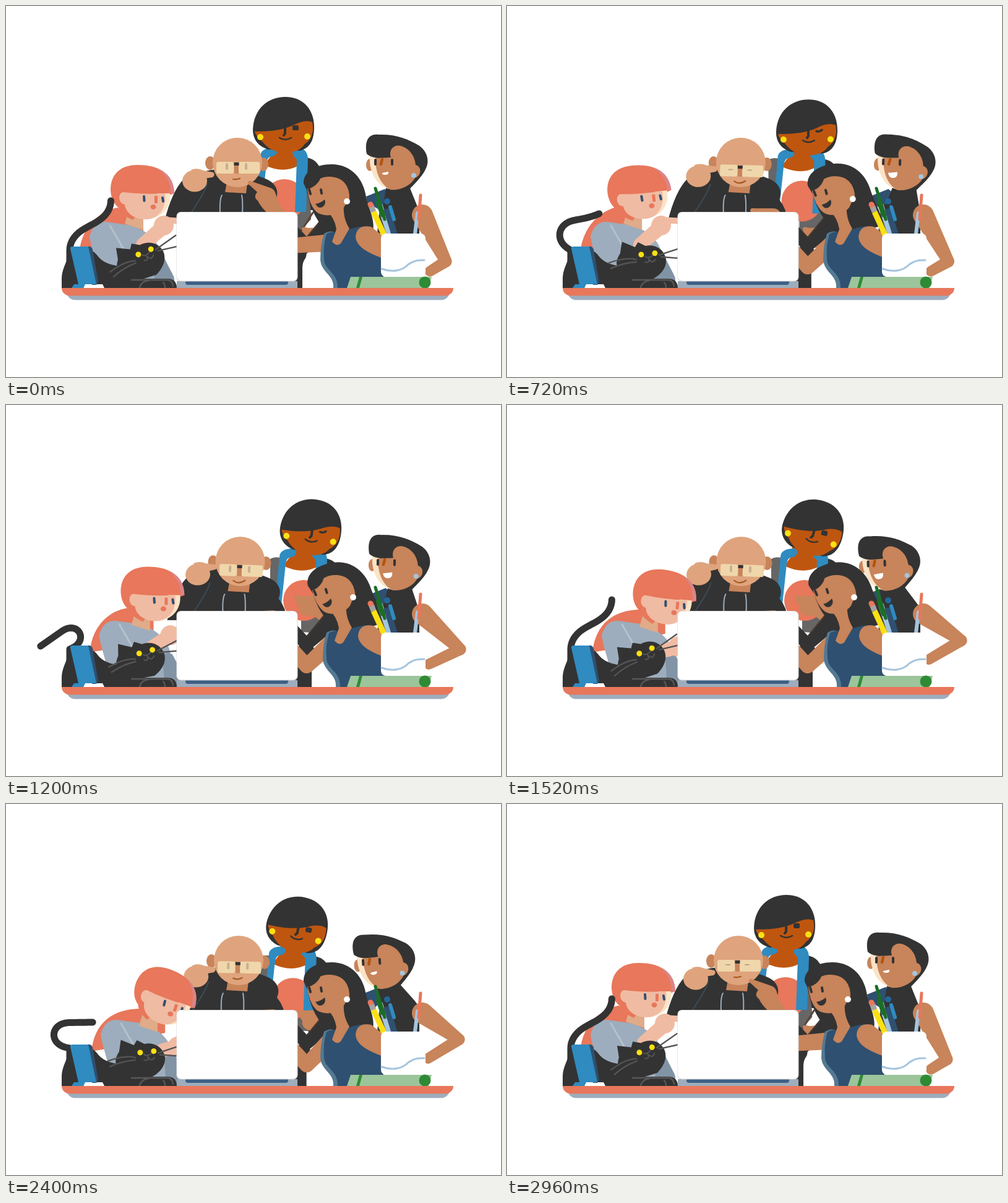
An HTML page with a canvas that plays this animation: 800 by 600 pixels, repeating every 3 s.

```html
<!DOCTYPE html>
<html lang="en">
<head>
<meta charset="utf-8">
<title>Around the laptop</title>
<style>
html, body { margin: 0; width: 100%; height: 100%; overflow: hidden; background: #fff; }
canvas { display: block; }
</style>
</head>
<body>
<canvas id="stage" width="800" height="600"></canvas>
<script>
const c = document.getElementById('stage').getContext('2d');
const DARK = '#333', CORAL = '#e8775b', TAN = '#c8845a', BLUE = '#2f8bc0', NAVY = '#2f5070',
  STEEL = '#9dadbd', CREAM = '#fbe3c6', PINK = '#f0bba3', SAND = '#dfa47d', BROWN = '#bf560f',
  SKY = '#a5c5de', YELLOW = '#fbe012', GRAY = '#666';
const LOOP = 3000, SWISH = LOOP / 2;
let now = 0;

const during = (a, b) => now >= a && now < b;
function ease(from, to, t) {
  const u = Math.max(0, Math.min(1, (t - from) / (to - from)));
  return u * u * (3 - 2 * u);
}
// Rises from 0 to 1 between a and b, falls back between d and e
const hold = (a, b, d, e, t = now) => ease(a, b, t) - ease(d, e, t);

function fill(color, d) { c.fillStyle = color; c.fill(new Path2D(d)); }
function line(color, width, d) {
  c.strokeStyle = color;
  c.lineWidth = width;
  c.stroke(new Path2D(d));
}
function oval(color, x, y, rx, ry = rx) {
  c.fillStyle = color;
  c.beginPath();
  c.ellipse(x, y, rx, ry, 0, 0, 7);
  c.fill();
}
function box(color, x, y, w, h, r = 0) {
  c.fillStyle = color;
  c.beginPath();
  c.roundRect(x, y, w, h, r);
  c.fill();
}
// Capsule whose ends have different radii
function limb(color, x1, y1, r1, x2, y2, r2) {
  const a = Math.atan2(y2 - y1, x2 - x1);
  const b = Math.acos((r1 - r2) / Math.hypot(x2 - x1, y2 - y1));
  c.fillStyle = color;
  c.beginPath();
  c.arc(x1, y1, r1, a + b, a - b + 2 * Math.PI);
  c.arc(x2, y2, r2, a - b, a + b);
  c.fill();
}
function move(dx, dy, deg, px, py, draw) {
  c.save();
  c.translate(px + dx, py + dy);
  c.rotate(deg * Math.PI / 180);
  c.translate(-px, -py);
  draw();
  c.restore();
}
const shift = (dx, dy, draw) => move(dx, dy, 0, 0, 0, draw);
const lookIn = () => hold(150, 900, 1700, 3000);

function standingWoman() {
  const lean = lookIn(), tilt = hold(600, 2000, 2050, 2900);
  shift(15 * lean, 0, () => fill(DARK, 'M440 390H480Q490 400 482 411Q479 416 479 425V456H440Z'));
  shift(31 * lean, 3 * lean, () => {
    fill(DARK, 'M484 245C500 246 511 260 513 282L508 330L484 330Z');
    fill(GRAY, 'M396 246Q402 242 412 244V330H396ZM466 295L486 300Q494 325 493 345L474 366L446 364V330Z');
    line('#5a4438', 3, 'M496 334L476 366');
    fill('#fff', 'M417 240H472V333H417Z');
    oval(CORAL, 450, 313, 33);
    oval(CORAL, 480, 282, 11);
    fill(BROWN, 'M430 222H468V240L473 258Q448 272 417 257L430 240Z');
    fill(BLUE, 'M411 243C411 234 419 229 433 229C441 230 439 242 431 243Q422 243 421 254L414 320H404ZM466 228C479 227 488 234 488 248L485 333H467L470 248Q462 242 463 234Z');
  });
  move(42 * lean, 5 * lean, 20 * tilt, 449, 211, () => {
    fill(DARK, 'M399 200C400 166 424 147 451 147C482 147 498 169 498 196C498 217 491 230 475 234L424 232C407 227 399 215 399 200Z');
    fill(BROWN, 'M402 203C430 203 450 200 466 192C478 186 488 185 495 188C499 207 491 218 483 223C475 235 463 237 450 237C432 237 421 228 414 219Q404 211 402 203Z');
    line(DARK, 4, 'M451 196V206L449 209');
    line(DARK, 2.4, 'M442 213Q451 219 461 213');
    if (during(610, 1370)) line(DARK, 3.5, 'M464 198Q468 200 473 196');
    else box(DARK, 463, 193, 10, 8, 2);
    oval(YELLOW, 411, 212, 5);
    oval(YELLOW, 487, 211, 5);
  });
}

function baldMan() {
  const lean = lookIn(), drop = hold(100, 900, 2450, 2950);
  shift(4.5 * lean, 0, () => {
    fill(DARK, 'M340 264Q318 266 304 274L287 280Q268 300 256 348H450Q448 328 436 313C442 300 437 285 416 278L400 272Z');
    line('#3b4c57', 2, 'M325 288Q322 300 300 333');
    fill(TAN, 'M357 284L390 286L388 303L354 301Z');
    line(STEEL, 2, 'M349 306Q345 312 346 336M381 306Q383 316 382 336');
    oval(TAN, 330, 254, 8, 11);
    oval(TAN, 416, 256, 8, 11);
    oval(SAND, 374, 253, 40);
  });
  move(5 * lean, 6 * lean, 2 * lean, 374, 260, () => {
    box(TAN, 369, 257, 7, 14, 2);
    box('#efd7ab', 340, 252, 28, 19, 3);
    box('#efd7ab', 376, 252, 34, 19, 3);
    box(DARK, 368.5, 253, 8, 5);
    if (during(660, 790) || now >= 2900) line('#b9a488', 1.8, 'M354 260H360M385 260H391');
    else { box('#c9ae93', 355, 254, 4, 11, 2); box('#c9ae93', 386, 254, 4, 11, 2); }
    const s = 4 * lean;
    line('#a55a20', 2.2, `M${367 - s} ${280 - s * .4}Q372 ${281 + s} ${378 + s} ${279 - s * .4}`);
  });
  move(5 * lean, -9 * lean, -4 * lean, 306, 282, () => {
    oval(SAND, 305, 283, 20, 17.5);
    fill(SAND, 'M299 265C306 262 313 263 319 266L335 269Q339 273 334 277L321 279L312 290Z');
  });
  move(8 * drop, 40 * drop, -22 * drop, 420, 305, () =>
    fill(TAN, 'M391 285Q393 281 398 284L427 294C438 298 435 307 441 319L453 336H424Q413 327 407 315Q399 309 406 301L394 290Q390 288 391 285Z'));
}

function rightPerson() {
  const hx = 11 * hold(100, 720, 900, 1600) - 24 * hold(1000, 1950, 2200, 2950);
  const hy = 3 * hold(300, 1500, 1900, 2900);
  shift(hx * .4, 0, () => fill(NAVY, 'M582 308L612 296L624 306L604 330L584 318Z'));
  fill(DARK, 'M600 368L604 325L640 305L668 326V368Z');
  limb(DARK, 638, 338, 30, 632 + hx, 288 + hy, 17);

  const lift = hold(750, 1600, 2350, 2900);
  const ex = 711 + 23 * hold(600, 1200, 2300, 2850), ey = 413 - 33 * lift;
  limb(TAN, 673, 338, 17, ex, ey, 9.5);
  limb(TAN, ex, ey, 9.5, 685 - 3 * lift, 429 - 18 * lift, 8.5);

  move(hx, hy, hx * .2, 631, 255, () => {
    oval(TAN, 588, 257, 6, 10);
    fill(CREAM, 'M588 242H610L625 297C602 295 586 271 588 242Z');
    fill(DARK, 'M583 239C579 218 586 206 602 208C630 207 650 215 668 226C682 236 684 252 679 262C672 279 654 292 646 304L624 298L650 270L622 245C607 248 590 246 583 239Z');
    fill(TAN, 'M597 246L622 245C618 232 627 224 637 226C653 230 661 244 662 257C672 259 672 275 661 278C654 291 636 299 621 297C604 288 597 268 597 246Z');
    line(DARK, 4, 'M597 249V256M624 249V256');
    line('#b4540f', 4.5, 'M608 248L606 256');
    const m = 5 * hold(100, 720, 1500, 2600);
    fill('#fff', `M${608 - m / 2} 270Q613 269 ${618 + m / 2} 268Q${619 + m / 2} ${273 + m} 613 ${273 + m}Q607 ${273 + m} ${608 - m / 2} 270Z`);
    oval(SKY, 659, 274, 4);
  });
}

function frontWoman() {
  const nod = hold(100, 1000, 2050, 2400), bend = hold(100, 650, 2500, 2950);
  const hide = 1 - hold(800, 1200, 2100, 2700);
  shift(12 * hide, 50 * hide, () =>
    fill(TAN, 'M466 309Q469 306 476 309L495 308C502 310 504 318 507 327L518 340L508 350Q498 338 487 341C477 341 471 333 473 326L467 317Z'));
  fill(DARK, 'M471 357L486 373L515 338L548 330V362L520 372L484 402L471 386Z');
  line('#4c3a30', 2, 'M487 373L515 339');
  const ex = 455 + 31 * bend, ey = 388 + 34 * bend;
  limb(TAN, 524 + 4 * nod, 383, 14, ex, ey, 12);
  limb(TAN, ex, ey, 12, 455, 388, 12);

  const withHead = draw => move(8 * nod, -2 * nod, -8 * nod, 530, 300, draw);
  withHead(() => fill(DARK, 'M481 287C480 268 500 256 526 256C560 256 577 282 581 304C585 326 597 345 593 364L548 372L524 370C504 352 491 328 488 302Z'));
  shift(4 * nod, 0, () => {
    fill('#547991', 'M514 368Q524 362 531 366L545 456H529C531 435 509 431 508 410Q508 388 514 368Z');
    fill(NAVY, 'M518 369Q524 364 533 366L553 362Q574 354 590 357L610 400V456H536C537 430 514 428 514 409Q512 389 518 369Z');
    fill(TAN, 'M518 331L546 320Q544 343 555 360L541 384Q534 390 527 381L534 361Q531 342 518 331Z');
    fill(TAN, 'M612 409C589 401 566 391 565 373Q567 353 590 357L612 374Z');
  });
  withHead(() => {
    fill(TAN, 'M487 296C497 294 505 287 508 279C520 273 540 276 548 287Q556 297 555 314Q548 321 544 329C535 338 519 341 507 336C495 331 489 313 487 296Z');
    if (during(1970, 2090)) { oval(DARK, 492, 301, 3); oval(DARK, 510, 300, 3); }
    else line(DARK, 4, 'M490 297L492 304M509 297L510 303');
    line(CORAL, 2, 'M492 316L498 317');
    fill(DARK, 'M500 320Q508 319 515 313C519 322 509 330 503 324Z');
    oval('#fff', 551, 316, 5);
  });
}

function deskRight() {
  line(CORAL, 9, 'M589 321L591 325');
  c.lineCap = 'butt';
  line('#a4a4a4', 9, 'M591 325L594 333');
  line(YELLOW, 9, 'M594 333L611 370');
  line(SKY, 9, 'M604 322L620 370');
  line(NAVY, 10, 'M615 328L628 370');
  c.lineCap = 'round';
  line('#1b6e24', 5, 'M597 295L612 345');
  line('#1b6e24', 8, 'M602 318L609 338');
  oval('#23679a', 616, 316, 5);
  line(BLUE, 6, 'M621 325L627 345');
  line(SKY, 6, 'M665 335L661 368');
  line(CORAL, 5, 'M670 306L667 345');
  box('#fff', 606, 368, 72, 70, 8);
  line(SKY, 3, 'M607 425C626 432 642 427 650 418C659 411 668 411 676 411');
  fill('#9cc59b', 'M557 438H688L683 456H551Z');
  fill('#2f8a35', 'M571 438H576L571 456H566Z');
  oval('#2f8a35', 677, 447, 9.5);
}

function redhead() {
  const back = hold(150, 650, 700, 1150), lean = hold(800, 1650, 2350, 2900);
  const slide = hold(720, 1350, 2400, 2900), peek = hold(1300, 1950, 2400, 2850);
  const hx = 36 * lean - 6 * back, hy = 10 * lean, bx = 18 * slide, tx = 118 + 20 * slide;
  fill(CORAL, `M${tx} 400C${tx + 5} 352 ${tx + 36} 332 ${180 + hx} ${326 + hy * .5}L${222 + hx} ${340 + hy}V${365 + hy * .5}L${150 + bx} 395Z`);
  shift(bx, 0, () => {
    fill(STEEL, 'M135 373C140 355 148 349 162 349L197 354C225 360 248 380 250 402L265 456H150C152 422 139 400 135 373Z');
    line('#b4c2cb', 3, 'M168 355L195 402');
    limb('#8194a5', 247, 410, 9, 256, 443, 16);
  });
  shift(hx * .65, hy * .7, () => fill('#e0ab88', 'M198 332H222V362L192 352Z'));

  const px = 257 + 23 * lean - 6 * back, py = 355 + 38 * lean;
  limb(PINK, 221 + 32 * lean - 6 * back, 386 + 13 * lean, 11, px, py, 12);
  oval(PINK, px - 2, py, 16);
  line(PINK, 10, `M${px - 4} ${py - 9}L285 ${py - 7}`);

  move(hx, hy, 19 * peek - 6 * back, 220, 305, () => {
    fill(CORAL, 'M169 298C169 270 187 257 213 257C250 257 272 274 272 303L225 320L205 346Q187 338 184 328Q170 318 169 298Z');
    fill('#da858a', 'M245 263Q271 273 272 303H266Q266 278 245 263Z');
    fill(CREAM, 'M245 303H265C267 322 256 342 229 345Z');
    fill(PINK, 'M190 301Q220 305 257 303C260 326 247 346 224 345C205 344 193 333 192 321C180 319 181 301 190 301Z');
    line(NAVY, 4, 'M223 308L223.5 315M253 310L254 316');
    box(CORAL, 240, 307, 5, 12, 1);
    oval(CORAL, 238, 325, 4.5, 4);
  });
}

// The tail grows segment by segment; its bend blends a rest, a curl and a whip
function tail(t) {
  const curl = hold(250, 950, 950, 1130, t), whip = hold(950, 1150, 1200, 1440, t);
  const steps = 28, length = 110;
  let x = 103, y = 395, d = `M103 419L${x} ${y}`;
  for (let i = 0; i < steps; i++) {
    const s = (i + .5) / steps;
    const rest = 62 * Math.sin(Math.PI * s);
    const curled = 170 * ease(0, .7, s) - 80, whipped = 65 - 190 * ease(0, .65, s);
    const bend = (rest * (1 - curl - whip) + curled * curl + whipped * whip) * Math.PI / 180;
    x += Math.sin(bend) * length / steps;
    y -= Math.cos(bend) * length / steps;
    d += `L${x} ${y}`;
  }
  line(DARK, 11, d);
}

function cat() {
  const t = now % SWISH;
  tail(t);
  fill(DARK, 'M90 456V440C91 420 102 412 100 396C115 385 140 392 148 404Q158 418 185 421L210 441H262Q276 442 276 456Z');
  move(0, 0, -9 - 9 * Math.cos((t - 50) / SWISH * 2 * Math.PI), 215, 412, () => {
    fill(DARK, 'M177 415Q178 407 183 400L186 381L207 390L212 382L224 388C242 385 255 396 257 410C258 426 246 436 235 442L180 442Z');
    oval(YELLOW, 217, 402, 4.5);
    oval(YELLOW, 239, 400, 4.5);
    line('#545454', 2.4, 'M209 410C194 406 179 410 165 415M209 414Q188 415 168 424M246 403L284 391M249 406L284 409');
    line('#555', 2, 'M223 405Q228 409 235 404M229 408Q231 417 223 414M230 410Q235 418 240 410');
  });
  line('#575757', 2.4, 'M203 443H262Q269 444 270 453M216 455Q219 445 230 444M254 447Q257 450 257 455');
  fill('#fff', 'M127 450H156L159 456H125Z');
  fill(NAVY, 'M132 389Q138 388 140 394L149 446L146 451H139Z');
  fill(BLUE, 'M104 393Q103 389 108 389H133L146 450H117ZM110 450H128L125 456H106Z');
}

function laptopAndTable() {
  box(STEEL, 276, 445, 195, 12);
  box('#3d6085', 290, 443, 166, 8, 4);
  box('#d3d3d3', 275.5, 333, 196, 112.5, 7);
  box('#fff', 276, 333.5, 194.5, 111, 7);
  box(STEEL, 98, 462, 619, 13.5, [0, 0, 20, 20]);
  box(CORAL, 90, 456, 633, 12.5, [0, 0, 13, 13]);
}

const start = performance.now();
function tick() {
  now = Math.floor((performance.now() - start) % LOOP / 40) * 40;
  c.fillStyle = '#fff';
  c.fillRect(0, 0, 800, 600);
  c.lineCap = c.lineJoin = 'round';
  standingWoman();
  baldMan();
  rightPerson();
  frontWoman();
  deskRight();
  redhead();
  cat();
  laptopAndTable();
  requestAnimationFrame(tick);
}
tick();
</script>
</body>
</html>
```
